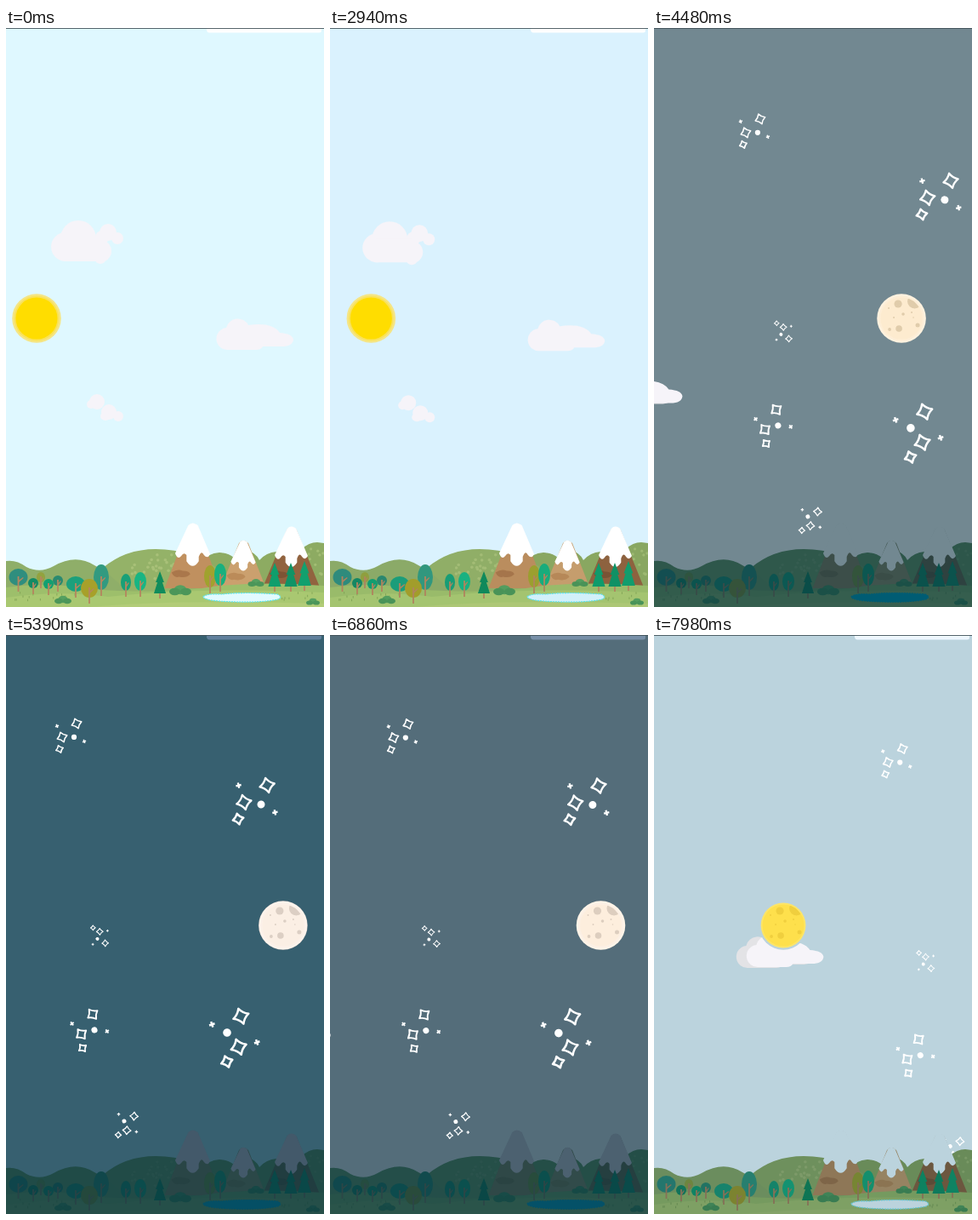
An HTML page for the animation above (8000 ms loop, 374x680 px).

```html
<!DOCTYPE html>
<html lang="en">
<head>
<meta charset="utf-8">
<title>Day and night</title>
<style>
html, body { margin: 0; width: 100%; height: 100%; overflow: hidden; }
svg { display: block; width: 100vw; height: 100vh; }
</style>
</head>
<body>
<svg id="stage" viewBox="0 0 374 680" preserveAspectRatio="none"></svg>
<script>
const NS = 'http://www.w3.org/2000/svg';
const stage = document.getElementById('stage');
const LOOP = 8000, STEP = 70;

function add(parent, tag, attrs = {}) {
  const el = document.createElementNS(NS, tag);
  for (const k in attrs) el.setAttribute(k, attrs[k]);
  return parent.appendChild(el);
}
const group = (parent, attrs) => add(parent, 'g', attrs);
const oval = (parent, cx, cy, rx, ry = rx, attrs = {}) =>
  add(parent, 'ellipse', { cx, cy, rx, ry, ...attrs });
const shape = (parent, d, attrs = {}) => add(parent, 'path', { d, ...attrs });

const rgb = hex => [1, 3, 5].map(i => parseInt(hex.slice(i, i + 2), 16));
const blend = (a, b, k) => a.map((v, i) => v + (b[i] - v) * k);
const css = c => `rgb(${c.map(Math.round).join()})`;

function segment(stops, x) {
  let i = 0;
  while (i < stops.length - 2 && x > stops[i + 1][0]) i++;
  const [a, b] = [stops[i], stops[i + 1]];
  return [i, Math.min(1, Math.max(0, (x - a[0]) / (b[0] - a[0])))];
}
function level(stops, x) {
  const [i, k] = segment(stops, x);
  return stops[i][1] + (stops[i + 1][1] - stops[i][1]) * k;
}
function ramp(...stops) {
  const list = stops.map(([x, hex]) => [x, rgb(hex)]);
  return x => {
    const [i, k] = segment(list, x);
    return css(blend(list[i][1], list[i + 1][1], k));
  };
}

// Progress from day (0) to night (1), smoothed with a monotone cubic.
const JOURNEY = [[0, 0], [2590, .02], [2940, .041], [3710, .542], [4480, .846],
  [4690, .846], [5670, .996], [5880, 1], [6650, 1], [6860, .937], [7980, .385]];
const slopes = JOURNEY.slice(1).map((b, i) => (b[1] - JOURNEY[i][1]) / (b[0] - JOURNEY[i][0]));
const tangents = JOURNEY.map((_, i) => {
  const a = slopes[i - 1] ?? slopes[i], b = slopes[i] ?? a;
  return a * b > 0 ? 2 * a * b / (a + b) : 0;
});
function progress(t) {
  const [i, k] = segment(JOURNEY, t);
  const span = JOURNEY[i + 1][0] - JOURNEY[i][0];
  const k2 = k * k, k3 = k2 * k;
  return JOURNEY[i][1] * (2 * k3 - 3 * k2 + 1) + JOURNEY[i + 1][1] * (3 * k2 - 2 * k3)
    + span * (tangents[i] * (k3 - 2 * k2 + k) + tangents[i + 1] * (k3 - k2));
}

const skyColor = ramp([0, '#dff8ff'], [.041, '#daf2fe'], [.385, '#bbd3dd'], [.542, '#a9bec7'],
  [.846, '#728891'], [.937, '#546d7a'], [1, '#084c61']);
const snowColor = ramp([0, '#ffffff'], [.041, '#ffffff'], [.385, '#bbd3dd'], [.542, '#a2abb3'],
  [.846, '#728891'], [.937, '#4c6170'], [1, '#344d61']);
const lakeColor = ramp([0, '#e2faff'], [.041, '#d2f0fa'], [.385, '#bbd3dd'], [.542, '#1f8196'],
  [.846, '#005c73'], [1, '#064a60']);
const shoreColor = ramp([0, '#5ce6f0'], [.385, '#62c4d2'], [.542, '#1f8196'],
  [.846, '#005c73'], [1, '#064a60']);
const barColor = ramp([0, '#ffffff'], [.041, '#ffffff'], [.385, '#eef7ff'], [.542, '#cfe0f0'],
  [.846, '#728891'], [.937, '#7890a8'], [1, '#3d6888']);
const discColor = ramp([0, '#ffdd00'], [.041, '#ffdd00'], [.385, '#fee04c'], [.542, '#fde58a'],
  [.846, '#fdebcf'], [.937, '#fdeedd'], [1, '#f9f0ee']);
const rimColor = ramp([0, '#f9e258'], [.385, '#fde567'], [.542, '#fde99c'],
  [.846, '#feeed6'], [1, '#fbf2f0']);
const haloColor = ramp([0, '#f5e584'], [.33, '#f8e68c'], [.385, '#bbd3dd'], [.43, '#faeaa0'],
  [.542, '#fbecb4'], [.846, '#fff2df'], [.937, '#fff4e8'], [1, '#fdf5f2']);
const craterColor = ramp([0, '#ffdd00'], [.041, '#ffdd00'], [.385, '#f0cf3e'], [.542, '#e8cf72'],
  [.846, '#e0ccab'], [1, '#dbd0cd']);
const DIM = [[0, 0], [.041, .03], [.385, .27], [.542, .43], [.846, .72], [.937, .79], [1, .87]];
const NIGHT = rgb('#083540');

const sky = add(stage, 'rect', { width: 374, height: 680 });

// Stars: one cluster reused with scale, turn and mirroring.
const stars = group(stage);
const gem = s => {
  const n = s * .32;
  return `M0 ${-s}Q${n} ${-n} ${s} 0Q${n} ${n} 0 ${s}Q${-n} ${n} ${-s} 0Q${-n} ${-n} 0 ${-s}Z`;
};
const PLUS = 'M-2.2 0H2.2M0-2.2V2.2';
function cluster(x, y, scale, turn, flip = 1) {
  const g = group(stars, {
    transform: `translate(${x} ${y}) rotate(${turn}) scale(${scale * flip} ${scale})`,
    fill: 'none', stroke: '#fff', 'stroke-width': 1.6, 'stroke-linejoin': 'round'
  });
  const put = (sx, sy, d) =>
    shape(g, d, { transform: `translate(${sx} ${sy}) rotate(-20)` });
  put(3, -16, gem(6.1));
  put(-14, 0, gem(6.1));
  put(-17, 14, gem(4.5));
  put(-20, -13, PLUS);
  put(12, 5, PLUS);
  oval(g, 0, 0, 3.1, 3.1, { fill: '#fff', stroke: 'none' });
}
cluster(66, 119, 1, 0);
cluster(286, 198, 1.45, 7);
cluster(93.5, 356, .64, 108);
cluster(90, 463, 1.15, -17);
cluster(125, 570, .8, 74, -1);
cluster(246, 466, 1.55, 51, -1);

// Clouds
const clouds = group(stage, { fill: '#f6f4f9' });
const shade = group(clouds, { fill: '#e3e3e6' });
const LONG = 'M262 378a13 13 0 0 1-3-26a14 14 0 0 1 26-3q28-4 37 9q15 1 16 8q-1 8-14 8h-22q-2 4-8 4Z';
shape(shade, LONG, { transform: 'translate(-12 1)' });
shape(clouds, LONG);
oval(clouds, 70, 257, 17);
oval(clouds, 85, 247, 21);
oval(clouds, 111, 262, 13);
oval(clouds, 111, 272, 6, 5);
oval(clouds, 120, 240, 10);
oval(clouds, 131, 247, 7);
oval(clouds, 113, 246, 8);
add(clouds, 'rect', { x: 68, y: 246, width: 44, height: 28 });
oval(clouds, 107, 439, 9, 9);
oval(clouds, 100, 442, 5);
oval(clouds, 121, 451, 9, 9);
oval(clouds, 117, 456, 6, 5);
oval(clouds, 132, 456, 6);

// Sun and moon share one disc.
const DISC = 24.5;
const orb = group(stage);
const halo = oval(orb, 0, 0, 28.8, 28.8, { stroke: '#3c4650' });
const rim = oval(orb, 0, 0, 26.4);
const disc = oval(orb, 0, 0, DISC);
oval(add(orb, 'clipPath', { id: 'face' }), 0, 0, DISC);
const craters = group(orb, { 'clip-path': 'url(#face)' });
for (const [x, y, r] of [[-4, -17, 4.6], [-3, 12, 3.8], [-14, 13, 1.9], [19, 8, 2.5],
  [2, -5, 1.8], [-15, -12, 1], [-9, -1, 1], [12, -7, 1], [14, -1, .8],
  [15.5, -20, 8.5]]) oval(craters, x, y, r);

// Landscape: parts keep their daylight colour and darken together.
const land = group(stage);
const parts = [];
function part(el, hex) {
  parts.push([el, rgb(hex)]);
  return el;
}
const snow = group(land);
const HILL = '#94b268', GROUND = '#a9c871', TRUNK = '#b5865f';

part(shape(land, 'M226 680V630Q238 616 251 616Q262 617 268 622Q275 614 283 614Q293 615 298 625' +
  'Q306 616 318 615Q338 613 348 612Q356 604 366 604L374 605V680Z'), '#8dab62');
part(shape(land, 'M60 680V655Q100 643 114 634Q140 612 176 612Q225 612 262 645V680Z'), HILL);
part(shape(land, 'M0 680V626Q12 624 24 633Q40 641 56 632Q82 617 104 631Q122 640 140 660V680Z'), '#8fae69');

let seed = 7;
const random = () => (seed = seed * 16807 % 2147483647) / 2147483647;
for (let i = 0; i < 40; i++) {
  const x = 122 + random() * 80, y = 617 + random() * 32;
  if (y > 652 - (x - 112) * .55) part(oval(land, x, y, 1.8), '#a8c078');
}
for (let i = 0; i < 12; i++) {
  part(oval(land, 356 + random() * 17, 609 + random() * 36, 1.6), '#a3bd74');
}

const snowCaps = [];
function mountain(x, top, base, half, hex, rock) {
  const k = (base - top) / 74;
  part(shape(land, `M${x - half} ${base}L${x - 5} ${top + 3}Q${x} ${top - 3} ${x + 6} ${top + 3}L${x + half} ${base}Z`), hex);
  const p = (dx, dy) => `${x + dx * k} ${top + dy * k}`;
  snowCaps.push(`M${p(-5, 2)}Q${p(0, -3)} ${p(6, 2)}L${p(20, 35)}Q${p(17, 41)} ${p(13, 36)}` +
    `Q${p(10, 30)} ${p(7, 38)}L${p(7, 43)}Q${p(0, 54)} ${p(-7, 43)}L${p(-7, 36)}` +
    `Q${p(-10, 32)} ${p(-13, 37)}Q${p(-17, 42)} ${p(-20, 34)}Z`);
  part(shape(land, `M${x - half * .75} ${base - 18 * k}q7-5 13-2q8 0 9 4q-5 5-13 3q-6 2-9-5Z`), rock);
}
mountain(279, 602, 656, 26, '#cba06e', '#bb8b59');
mountain(219.5, 582, 658, 33, '#c0905f', '#aa774b');
mountain(335.5, 586, 658, 34, '#91633f', '#7d5334');
land.appendChild(snow);
snowCaps.forEach(d => shape(snow, d));

part(shape(land, 'M0 680V657Q50 650 100 659Q190 666 250 655Q310 650 374 655V680Z'), '#9dbf6b');
part(shape(land, 'M0 680V669Q60 660 120 668Q230 656 374 663V680Z'), GROUND);
part(shape(land, 'M100 680Q190 671 374 676V680Z'), '#b2cc78');
for (let i = 0; i < 24; i++) {
  const x = (i < 14 ? 10 : 322) + random() * (i < 14 ? 80 : 42);
  part(add(land, 'rect', { x, y: 662 + random() * 9, width: 1, height: 2.5 }), '#86a858');
}

const lake = shape(land, 'M232 668Q236 664 253 665Q282 662 319 665Q326 668 320 671Q300 675 270 674Q232 673 232 668Z',
  { 'stroke-width': 1.2, 'stroke-dasharray': '2 1' });

function trunk(x, y, h) {
  part(add(land, 'rect', { x: x - .9, y, width: 1.8, height: h }), TRUNK);
}
function tree(x, y, rx, ry, hex) {
  part(oval(land, x, y, rx, ry), hex);
  trunk(x, y - 1, ry + 8);
  part(shape(land, `M${x} ${y + 4}l${rx * .5}-4l.6 1l${-rx * .5} 5Z`), TRUNK);
}
function pine(x, top, h, hex) {
  trunk(x, top + h - 6, 12);
  const w = h * .27;
  part(shape(land, `M${x} ${top}l${w * .7} ${h * .5}h-2l${w * .3 + 2} ${h * .5}H${x - w}l${w * .3 + 2} ${-h * .5}h-2Z`), hex);
}
function bush(x, y, w) {
  part(oval(land, x, y - w * .1, w * .55, w * .42), '#55a060');
  part(oval(land, x - w * .5, y + 1, w * .5, w * .32), '#4b9659');
  part(oval(land, x + w * .5, y + 1, w * .5, w * .32), '#4b9659');
}
tree(41, 645, 5, 6, '#93a23e');
tree(14.5, 645, 11, 10, '#2f8e7e');
tree(32, 652, 6, 6, '#148a64');
tree(61, 649, 6, 6, '#2a8a70');
tree(50, 653, 6, 6, '#12a071');
tree(112, 645, 9, 15, '#329a80');
tree(82, 653, 11, 9, '#1ca07c');
tree(98, 658, 10, 11, '#a7a02a');
tree(141, 651, 6, 10, '#18a078');
tree(158, 650, 7, 11, '#18b583');
pine(181, 638, 26, '#108c5c');
tree(240, 644, 7, 13, '#a0a22e');
tree(252, 642, 7, 13, '#18b07e');
pine(316, 628, 28, '#0f9e6c');
pine(335, 628, 28, '#0f9466');
pine(351, 626, 29, '#12a06e');
bush(205, 661, 13);
bush(67, 672, 10);
bush(294, 652, 9.5);
bush(361, 674, 8);

// Top edge
const bar = shape(stage, 'M236 0H371V3Q371 5.5 368 5.5H239Q237 5.5 236 3Z');
add(stage, 'rect', { width: 374, height: .9, fill: '#46555c' });

function render(t) {
  const p = progress(t), q = 1 - p;
  sky.setAttribute('fill', skyColor(p));
  snow.setAttribute('fill', snowColor(p));
  lake.setAttribute('fill', lakeColor(p));
  lake.setAttribute('stroke', shoreColor(p));
  bar.setAttribute('fill', barColor(p));
  disc.setAttribute('fill', discColor(p));
  rim.setAttribute('fill', rimColor(p));
  halo.setAttribute('fill', haloColor(p));
  halo.setAttribute('stroke-width', Math.max(0, (p - .95) * 14));
  craters.setAttribute('fill', craterColor(p));
  craters.setAttribute('opacity', level([[.041, 0], [.2, 1]], p));
  shade.setAttribute('opacity', level([[.041, 0], [.3, 1]], p));

  orb.setAttribute('transform', `translate(${36 + 301.5 * p} 341)`);
  clouds.setAttribute('transform', `translate(${-360 * p} ${30 * p + 112 * p ** 6})`);
  stars.setAttribute('transform', `translate(${363 * q} ${25 * q + 220 * q ** 5.5})`);

  const dim = level(DIM, p);
  for (const [el, c] of parts) el.setAttribute('fill', css(blend(c, NIGHT, dim)));
}

const start = performance.now();
function tick() {
  const t = (performance.now() - start) % LOOP;
  render(Math.floor(t / STEP) * STEP);
  requestAnimationFrame(tick);
}
render(0);
requestAnimationFrame(tick);
</script>
</body>
</html>
```
